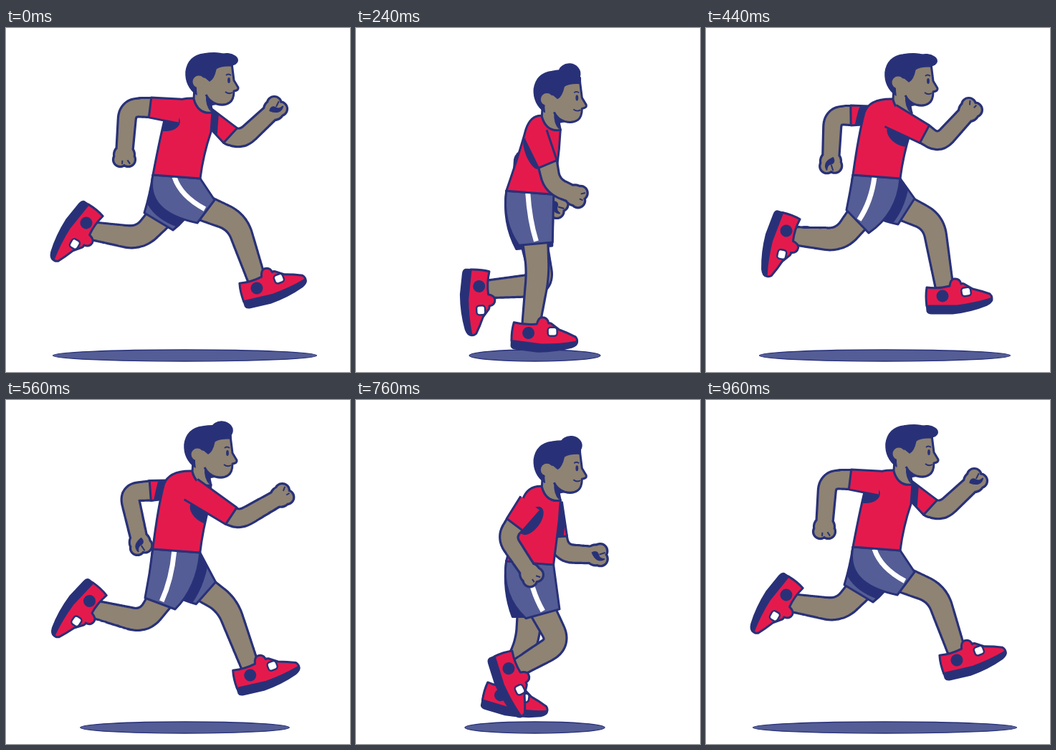
An HTML page with a canvas for the animation above (1000 ms loop, 480 by 480 pixels).

```html
<!DOCTYPE html>
<html lang="en">
<head>
<meta charset="utf-8">
<title>Runner</title>
<style>
html, body { margin: 0; width: 100%; height: 100%; overflow: hidden; background: #fff; }
canvas { display: block; width: 480px; height: 480px; }
</style>
</head>
<body>
<canvas id="stage" width="480" height="480"></canvas>
<script>
const ctx = document.getElementById('stage').getContext('2d');
const NAVY = '#283178', RED = '#e51a4c', SKIN = '#8f8373', BLUE = '#545d95', WHITE = '#fff';
const STEP = 40, STEPS = 25, CYCLE = 24, LINE = 3;

// Pose times within one stride cycle, in steps
const TIMES = [0, 4, 5, 9, 11, 12, 16, 17, 21, 23];
const HALF = [0, 4, 5, 9, 11];

// Shorts hem back x,y, hem front x,y, knee x,y, shoe x,y, shoe angle
const LEG = [
  [267, 272, 291, 240, 322, 270, 350, 363, -13],
  [256, 301, 291, 275, 285, 312, 307, 418, -4],
  [240, 306, 285, 291, 271, 335, 278, 433, 0],
  [198, 280, 238, 304, 203, 327, 130, 358, 46],
  [196, 254, 227, 286, 188, 296, 112, 283, 111],
  [193, 258, 233, 282, 187, 294, 112, 272, 129],
  [202, 297, 245, 306, 214, 337, 131, 310, 122],
  [213, 306, 263, 310, 242, 358, 151, 341, 110],
  [258, 294, 295, 265, 313, 302, 278, 389, 33],
  [268, 274, 291, 238, 317, 270, 330, 374, 0]
];

// Sleeve hem x,y, elbow x,y, fist x,y
const ARM = [
  [201, 111, 170, 111, 165, 177],
  [218, 160, 200, 172, 234, 231],
  [250, 185, 250, 212, 276, 244],
  [294, 170, 302, 188, 363, 163],
  [305, 148, 325, 162, 367, 116],
  [313, 150, 328, 157, 374, 114],
  [292, 178, 298, 192, 362, 182],
  [253, 189, 253, 212, 308, 233],
  [208, 147, 185, 152, 199, 218],
  [202, 122, 177, 122, 174, 186]
];

// Ear x,y, waist x,y, back bulge, quiff lift, ground shadow half width
const BODY = [
  [270, 75, 205, 205, -52, 0, 184.5],
  [266, 84, 206, 216, -50, 1, 99],
  [267, 97, 209, 226, -37, 0.95, 90],
  [267.5, 88, 208, 216, -52, 0.15, 123.5],
  [269, 76, 205, 205, -54, 0, 175.5]
];

// The far limbs differ slightly around the passing poses
const swap = (rows, i, row) => rows.map((r, k) => k === i ? row : r);
const FAR_LEG = swap(swap(LEG, 8, [254, 300, 291, 268, 299, 318, 245, 390, 47]),
  3, [203, 288, 250, 302, 207, 328, 134, 363, 47]);
const FAR_ARM = swap(swap(ARM, 8, [215, 152, 204, 175, 222, 224]),
  3, [297, 177, 305, 189, 371, 169]);

// Periodic cubic interpolation through unevenly spaced rows
function sample(times, rows, period, t) {
  t = (t % period + period) % period;
  const n = times.length;
  const at = i => times[(i + n) % n] + Math.floor(i / n) * period;
  const row = i => rows[(i + n) % n];
  let i = n - 1;
  while (times[i] > t) i--;
  const h = at(i + 1) - at(i), u = (t - at(i)) / h;
  const slope = (k, c) => {
    const h0 = at(k) - at(k - 1), h1 = at(k + 1) - at(k);
    const a = row(k - 1)[c], b = row(k)[c], d = row((k + 1) % n)[c];
    const bend = ((d - b) / h1 * h0 + (b - a) / h0 * h1) / (h0 + h1);
    return (bend + (d - a) / (h0 + h1)) / 2;
  };
  return row(i).map((p, c) => {
    const q = row((i + 1) % n)[c];
    const m0 = slope(i, c) * h, m1 = slope((i + 1) % n, c) * h;
    const u2 = u * u, u3 = u2 * u;
    return (2 * u3 - 3 * u2 + 1) * p + (u3 - 2 * u2 + u) * m0 + (3 * u2 - 2 * u3) * q + (u3 - u2) * m1;
  });
}

const mix = (a, b, k) => [a[0] + (b[0] - a[0]) * k, a[1] + (b[1] - a[1]) * k];
const dist = (a, b) => Math.hypot(b[0] - a[0], b[1] - a[1]) || 1;
const quad = (a, b, c, u) => mix(mix(a, b, u), mix(b, c, u), u);

function paint(path, fill, width = LINE) {
  if (fill) { ctx.fillStyle = fill; ctx.fill(path); }
  if (width) { ctx.lineWidth = width; ctx.strokeStyle = NAVY; ctx.stroke(path); }
}

function discs(list, color, grow) {
  ctx.beginPath();
  for (const [x, y, r] of list) {
    ctx.moveTo(x + r + grow, y);
    ctx.arc(x, y, r + grow, 0, 7);
  }
  ctx.fillStyle = color;
  ctx.fill();
}

function flesh(list) {
  discs(list, NAVY, LINE - 0.4);
  discs(list, SKIN, -0.6);
}

// Tapered limb with a rounded joint, as a chain of discs
function limb(a, b, c, w0, w1, round) {
  const p = mix(b, a, Math.min(0.9, round / dist(a, b)));
  const q = mix(b, c, Math.min(0.9, round / dist(b, c)));
  const pts = [];
  for (let i = 0; i <= 30; i++) pts.push(mix(a, p, i / 30));
  for (let i = 1; i <= 20; i++) pts.push(quad(p, b, q, i / 20));
  for (let i = 1; i <= 50; i++) pts.push(mix(q, c, i / 50));
  return pts.map(([x, y], i) => [x, y, (w0 + (w1 - w0) * i / 100) / 2]);
}

function within(clip, draw) {
  ctx.save();
  ctx.clip(clip);
  draw();
  ctx.restore();
}

function placed(x, y, angle, draw) {
  ctx.save();
  ctx.translate(x, y);
  ctx.rotate(angle);
  draw();
  ctx.restore();
}

const SOLE = new Path2D('M-22 10L-21 21Q-20 24 -15 24L14 24Q40 21 62 12Q70 8 69 3Z');
const UPPER = new Path2D('M-22 -12Q-24 0 -22 14L20 14Q45 11 67 4Q71 2 66 -3Q55 -7 42 -10L30 -17Q28 -18 26 -17Q24 -25 16 -24Q11 -23 10 -14Q-5 -10 -22 -12Z');
const LACE = new Path2D();
LACE.roundRect(-6.5, -6, 13, 12, 4);

function shoe(x, y, deg) {
  placed(x, y, deg * Math.PI / 180, () => {
    paint(SOLE, NAVY);
    paint(UPPER, RED);
    discs([[0, 0, 8.5]], NAVY, 0);
    placed(33, -6, -0.15, () => paint(LACE, WHITE, 2.5));
  });
}

function leg([bx, by, fx, fy, kx, ky, sx, sy, deg], waist) {
  const a = deg * Math.PI / 180, c = Math.cos(a), s = Math.sin(a);
  const ankle = [sx + 2 * c + 16 * s, sy + 2 * s - 16 * c];
  const hem = [(bx + fx) / 2, (by + fy) / 2];
  const top = mix(hem, [waist[0] + 33, waist[1] + 3], 0.12);
  flesh(limb(top, [kx, ky], ankle, 34, 23, 20));
  shoe(sx, sy, deg);
}

function shortsPath([bx, by, fx, fy], [wx, wy]) {
  const rx = wx + 66, ry = wy + 5, fwd = Math.max(0, bx - wx);
  const p = new Path2D();
  p.moveTo(wx, wy);
  p.quadraticCurveTo(wx - 4 - fwd * 0.12, (wy + by) / 2 + fwd * 0.3, bx, by);
  p.lineTo(fx, fy);
  p.quadraticCurveTo(Math.max(rx - 4, (fx + rx) / 2), (fy + ry) / 2 + Math.max(0, rx - fx) * 0.25, rx, ry);
  p.closePath();
  return p;
}

function stripe([bx, by, fx, fy], [wx, wy]) {
  const a = [wx + 30, wy + 3], end = mix([bx, by], [fx, fy], 0.53), b = mix(end, a, 0.05);
  ctx.beginPath();
  ctx.moveTo(...a);
  ctx.quadraticCurveTo(a[0] + (b[0] - a[0]) * 0.2, (a[1] + b[1]) / 2 + 4, ...b);
  ctx.lineWidth = 7;
  ctx.strokeStyle = WHITE;
  ctx.stroke();
}

function torsoPath([ex, ey, wx, wy, back]) {
  const p = new Path2D();
  p.moveTo(ex - 8, ey + 23);
  p.quadraticCurveTo(ex + back + 13, ey + 22, ex + back + 6, ey + 42);
  p.quadraticCurveTo(ex + back - 2, ey + 72, wx, wy);
  p.lineTo(wx + 66, wy + 5);
  p.quadraticCurveTo(wx + 70, (wy + ey + 75) / 2, ex + 16, ey + 70);
  p.lineTo(ex + 18, ey + 42);
  p.quadraticCurveTo(ex - 2, ey + 45, ex - 8, ey + 23);
  return p;
}

// Sleeve outline left open where it joins the shirt
function sleeve(root, hem, r0, r1) {
  const l = dist(root, hem), dx = (hem[0] - root[0]) / l, dy = (hem[1] - root[1]) / l;
  const off = ([x, y], r) => [x + dy * r, y - dx * r];
  const path = new Path2D();
  path.moveTo(...off(root, r0));
  path.lineTo(...off(hem, r1));
  path.lineTo(...off(hem, -r1));
  path.lineTo(...off(root, -r0));
  const side = dx < 0 ? 1 : -1;
  return { path, dx, angle: Math.atan2(dy, dx), pit: mix(off(root, r0 * side), off(hem, r1 * side), 0.5) };
}

const PALM = new Path2D('M-5 -3Q2 -7 4 1Q6 5 12 5Q2 11 -5 -3ZM13 -4L5 -1');
const KNUCKLE = new Path2D('M12 -9L7 -5M13 2L8 2');

function arm([sx, sy, ex, ey, hx, hy], mark) {
  const a = Math.atan2(hy - ey, hx - ex), c = Math.cos(a), s = Math.sin(a);
  const fist = [[0, 0, 13.5], [6, -6, 9], [7, 5, 9]].map(([x, y, r]) => [hx + x * c - y * s, hy + x * s + y * c, r]);
  flesh(limb([sx, sy], [ex, ey], [hx, hy], 25, 21, 16).concat(fist));
  placed(hx, hy, a, () => paint(mark, mark === PALM && NAVY, 2));
}

const JAW = 'M20 -28L45 -26Q47 -10 48 -2L54 8Q55 12 48 13Q48 25 42 29Q35 34 24 31Q14 28 9 18';
const FACE_LINE = new Path2D(JAW);
const FACE = new Path2D(JAW + 'L-4 10L-4 -14Z');
const NECK = new Path2D('M-7 8L-8 24Q-2 46 18 43L15 28L8 10Z');
const CHIN = new Path2D('M9 18Q14 29 24 32L18 33Q15 35 16 42Q8 34 9 18Z');
const HAIR = new Path2D('M-4 18Q-20 6 -19 -14Q-16 -36 6 -39Q36 -44 46 -30L46 -22Q30 -23 23 -18Q20 -4 14 -1L8 -6Q-8 -8 -4 18Z');
const SMILE = new Path2D('M36 14Q41 18 46 15M37 -9Q40 -12 44 -9');

function head(x, y, lift) {
  placed(x, y, 0, () => {
    paint(NECK, SKIN);
    paint(CHIN, NAVY, 0);
    paint(FACE, SKIN, 0);
    paint(FACE_LINE, null);
    paint(HAIR, NAVY, 1.5);
    ctx.beginPath();
    ctx.ellipse(39 - 11 * lift, -31 - 6 * lift, 15 + lift, 9 + 7 * lift, 0.1, 0, 7);
    ctx.fill();
    discs([[-1, 0, 8.5]], SKIN, 0);
    ctx.beginPath();
    ctx.ellipse(41, -2, 1.9, 4, 0, 0, 7);
    ctx.fillStyle = NAVY;
    ctx.fill();
    paint(SMILE, null, 1.8);
  });
}

function draw(t) {
  const body = sample(HALF, BODY, CYCLE / 2, t);
  const [ex, ey, wx, wy, , lift, spread] = body, waist = [wx, wy];
  const nearLeg = sample(TIMES, LEG, CYCLE, t), nearArm = sample(TIMES, ARM, CYCLE, t);
  const farLeg = sample(TIMES, FAR_LEG, CYCLE, t + CYCLE / 2);
  const farArm = sample(TIMES, FAR_ARM, CYCLE, t + CYCLE / 2);
  const shorts = shortsPath(nearLeg, waist), farShorts = shortsPath(farLeg, waist);
  const torso = torsoPath(body);

  ctx.fillStyle = WHITE;
  ctx.fillRect(0, 0, 480, 480);
  ctx.lineJoin = 'round';
  const ground = new Path2D();
  ground.ellipse(249.5, 457, spread - 0.5, 8, 0, 0, 7);
  paint(ground, BLUE, 1.3);

  leg(farLeg, waist);
  paint(farShorts, BLUE);
  within(farShorts, () => paint(shorts, null, 26));

  arm(farArm, PALM);
  const farSleeve = sleeve([ex + 10, ey + 45], farArm, 10, 14).path;
  paint(farSleeve, RED);
  within(farSleeve, () => paint(torso, null, 18));

  leg(nearLeg, waist);
  paint(shorts, BLUE);
  within(shorts, () => stripe(nearLeg, waist));
  paint(torso, RED);

  const root = mix([ex - 20, ey + 42], nearArm, 0.15);
  const cuff = sleeve(root, nearArm, 17, 14);
  within(torso, () => {
    ctx.beginPath();
    ctx.ellipse(...cuff.pit, 23, Math.min(15, 20 * Math.abs(cuff.dx)), cuff.angle, 0, 7);
    ctx.fillStyle = NAVY;
    ctx.fill();
  });

  head(ex, ey, lift);
  arm(nearArm, KNUCKLE);
  paint(cuff.path, RED);
}

const start = performance.now();
function tick() {
  const step = Math.floor((performance.now() - start) / STEP) % STEPS;
  draw(step % CYCLE);
  requestAnimationFrame(tick);
}
tick();
</script>
</body>
</html>
```
